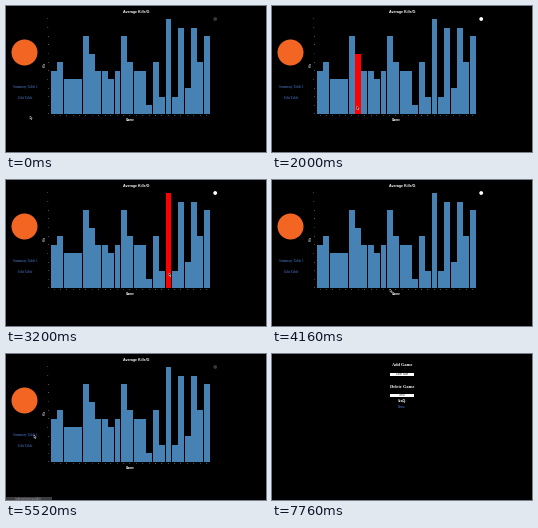
These frames come from a looping animation (260x146 px, 8 s). A matplotlib script:

```python
import matplotlib.pyplot as plt
import numpy as np
from matplotlib.animation import FuncAnimation
from matplotlib.patches import Circle, Polygon, Rectangle

W, H, DPI = 260, 146, 100
STEP, FRAMES = 80, 100
LEFT, BASE, PITCH, UNIT = 44.9, 108.0, 6.37, 8.64
VALUES = [5, 6, 4, 4, 4, 9, 7, 5, 5, 4, 5, 9, 6,
          5, 5, 1, 6, 2, 11, 2, 10, 3, 10, 6, 9]
BLUE, RED, LINK = "#4682b4", "#ff0000", "#4a78c8"
PAGE_SWITCH = 5760

# Pointer path: time in ms, x, y
PATH = np.array([
    (0, 24, 110), (560, 24, 110), (1280, 46, 105), (1360, 47, 104),
    (2240, 99, 99), (2560, 119.5, 94), (3040, 161, 93), (3200, 163, 93),
    (3600, 188, 98), (3760, 176, 108.5), (4000, 131, 108.5),
    (4160, 118, 109), (4880, 38, 109), (5200, 28, 81), (5680, 28, 81),
    (6480, 130, 25), (7040, 131, 45), (8000, 131, 45),
])

fig = plt.figure(figsize=(W / DPI, H / DPI), dpi=DPI, facecolor="black")
ax = fig.add_axes([0, 0, 1, 1])
ax.set(xlim=(0, W), ylim=(H, 0))
ax.axis("off")


def label(x, y, text, px, color="white", font="Liberation Serif", **kw):
    return ax.text(x, y, text, fontsize=px * 72 / DPI, color=color,
                   family=font, ha="center", va=kw.pop("va", "center"), **kw)


def box(x, y, w, h, color, **kw):
    return ax.add_patch(Rectangle((x, y), w, h, facecolor=color, lw=0, **kw))


def build_chart_page():
    items = [ax.add_patch(Circle((18.5, 46.5), 13, color="#f26522", lw=0))]
    items += [label(19.5, 81, "Summary Table 1", 3.5, LINK),
              label(19.5, 92, "Edit Table", 3.5, LINK)]
    sans = "Liberation Sans"
    items += [label(130.5, 5.5, "Average Kills/G", 3.6, font=sans, weight="bold"),
              label(124, 114, "Game", 3.1, font=sans, weight="bold"),
              label(39, 58, "Kills", 2.8, font=sans, rotation=90)]
    for n in range(12):
        items.append(label(42, BASE - n * UNIT, str(n), 2, "#c8c8c8", sans))
    for n in range(len(VALUES)):
        items.append(label(LEFT + (n + 0.5) * PITCH, 109.2, str(n + 1),
                           2, "#c8c8c8", sans))
    return items


def build_form_page():
    items = [label(130, 11.5, "Add Game", 4.4, weight="bold"),
             label(130.5, 33, "Delete Game", 4.4, weight="bold"),
             label(130, 53, "Home", 3.4, LINK)]
    for y, text in ((18.5, "Enter date"), (39.5, "Game")):
        items += [box(118, y, 24, 3.7, "white"),
                  label(130, y + 1.9, text, 2.6, "#444444", "Liberation Sans")]
    return items


chart_page = build_chart_page()
bars = [box(LEFT + n * PITCH, BASE - v * UNIT, PITCH - 0.5, v * UNIT, BLUE)
        for n, v in enumerate(VALUES)]
menu = ax.add_patch(Circle((209.2, 13), 1.9, color="white", lw=0))
status = [box(0, 143, 46, 3, "#3c3c3c"),
          label(22, 144.6, "localhost/summary/table", 2.5, "#a0a0a0",
                "Liberation Sans")]
chart_page += bars + [menu]
form_page = build_form_page()
button = label(130, 47, "Send", 3.6, weight="bold")
form_page.append(button)

ARROW = np.array([(0, 0), (0, 3.2), (0.8, 2.5), (1.4, 3.6),
                  (1.9, 3.3), (1.4, 2.3), (2.3, 2.2)])
pointer = ax.add_patch(Polygon(ARROW, facecolor="black", edgecolor="white",
                               lw=0.25, zorder=5))


def hovered_bar(x, y):
    n = int((x - LEFT) // PITCH)
    if 0 <= n < len(VALUES) and BASE - VALUES[n] * UNIT <= y < BASE:
        return n
    return None


def draw(frame):
    t = frame * STEP
    x, y = (np.interp(t, PATH[:, 0], PATH[:, k]) for k in (1, 2))
    on_chart = t < PAGE_SWITCH
    for item in chart_page:
        item.set_visible(on_chart)
    for item in form_page:
        item.set_visible(not on_chart)
    for item in status:
        item.set_visible(5120 <= t < PAGE_SWITCH)

    active = hovered_bar(x, y) if on_chart else None
    for n, bar in enumerate(bars):
        bar.set_facecolor(RED if n == active else BLUE)
    menu.set_alpha(1.0 if x >= 37 else 0.22)
    button.set_color("#b8b8d8" if 7600 <= t < 7760 else "white")
    pointer.set_xy(ARROW + (x, y))
    return []


animation = FuncAnimation(fig, draw, frames=FRAMES, interval=STEP,
                          repeat=True, repeat_delay=0, blit=False)
plt.show()
```
